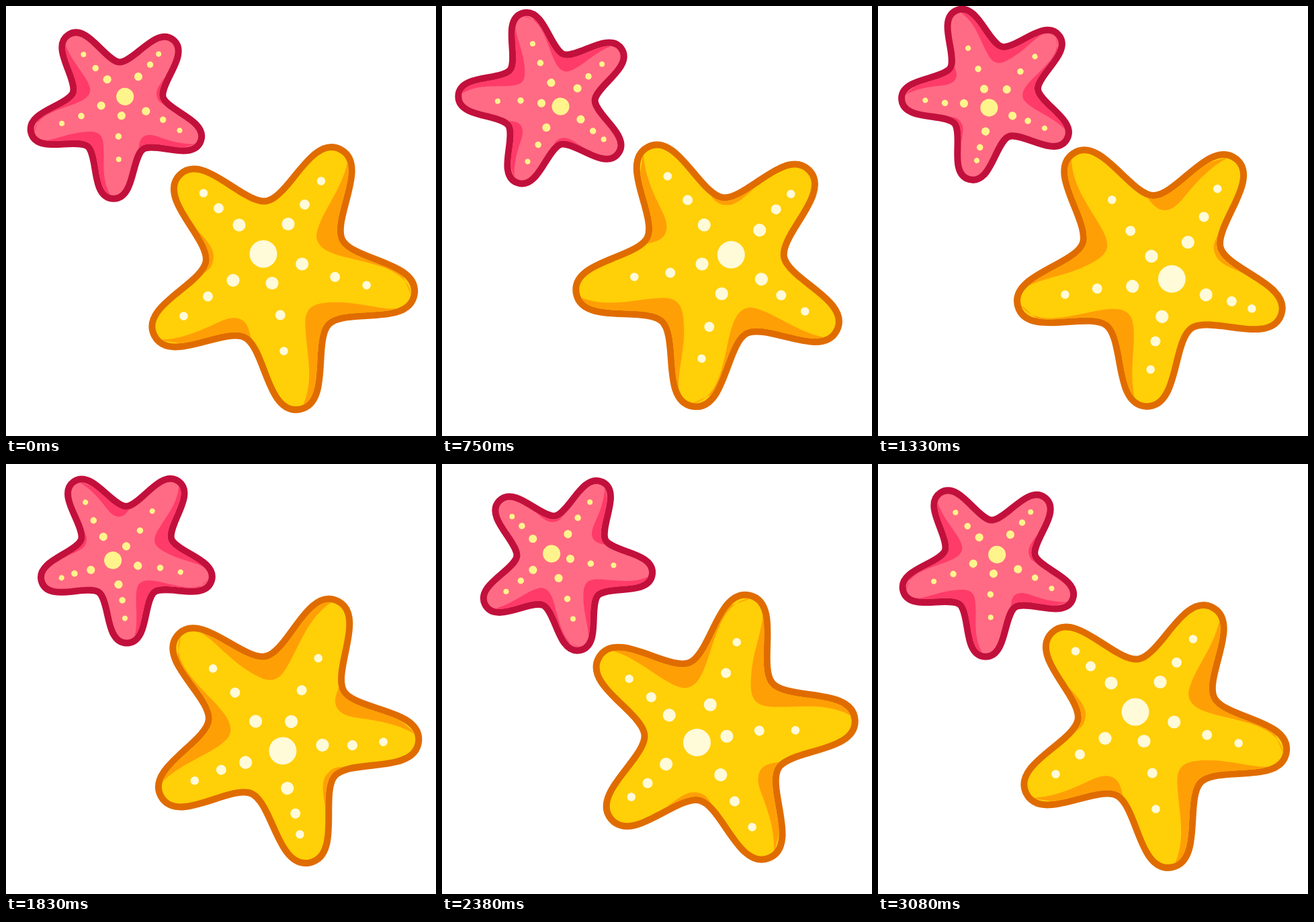
Animation, 640 px wide and 640 px high, one loop 3.12 s. Source, as an HTML page:

```html
<!DOCTYPE html>
<html lang="en">
<head>
<meta charset="utf-8">
<title>Two turning starfish</title>
<style>
  html, body { margin: 0; width: 100%; height: 100%; overflow: hidden; background: #fff; }
  svg { display: block; width: 100vw; height: 100vh; }
</style>
</head>
<body>
<svg id="stage" viewBox="0 0 640 640"></svg>
<script>
const LOOP = 3120;
const TURN = 93;   // poses in one full turn
const RIM = 10;    // outline width, the same on both stars

// Both stars share one drawing; the pink one is smaller and mirrored.
const HUB = [404.3, 397];
const stars = [
  { at: [165.6, 154], pivot: [169.4, 141.8], tilt: 173.8, size: 0.636, flip: -1,
    fill: '#ff6b84', shade: '#ff3b69', edge: '#c2103c', dot: '#fff48c' },
  { at: HUB, pivot: [406, 393.7], tilt: 0, size: 1, flip: 1,
    fill: '#ffcf08', shade: '#ff9f06', edge: '#e06c00', dot: '#fffad8' }
];

// Shadows in four of the five notches.
const shades = [
  'M510 222C505 270 465 310 462 342C463 368 500 372 535 381S598 400 604 432',
  'M592 447C575 458 530 440 490 441C450 441 443 452 446 485C449 525 459 560 440 599',
  'M226 497C265 497 300 478 320 469S357 463 362 484S368 505 376 520',
  'M254 296C268 322 309 350 309 372S294 396 280 408'
];

// Five spokes of dots, from the middle outwards.
const middle = [383, 369, 20.5];
const dotSizes = [9.6, 7.5, 6.3];
const spokes = [
  [[347, 326], [316.5, 301], [294, 278.5]],
  [[420, 324.5], [444.5, 295.5], [469, 260.5]],
  [[440.7, 384], [489.7, 403.3], [536.7, 415.5]],
  [[396, 412.5], [408.3, 460], [413.5, 513.5]],
  [[338, 408.3], [300.5, 432.3], [264.5, 461.5]]
];
const dots = [middle, ...spokes.flatMap(s => s.map((p, i) => [...p, dotSizes[i]]))];

// Regular star with rounded tips and notches.
function starPath() {
  const tip = 201, notch = 103, tipPull = 43.5, notchPull = 37, first = -63;
  // A point at a radius and angle, moved sideways along the circle's tangent.
  const point = (radius, degrees, side) => {
    const a = degrees * Math.PI / 180, c = Math.cos(a), s = Math.sin(a);
    return `${HUB[0] + radius * c - side * s} ${HUB[1] + radius * s + side * c} `;
  };
  let d = 'M' + point(tip, first, 0);
  for (let k = 0; k < 5; k++) {
    const a = first + 72 * k, b = a + 36, c = a + 72;
    d += 'C' + point(tip, a, tipPull) + point(notch, b, -notchPull) + point(notch, b, 0);
    d += 'C' + point(notch, b, notchPull) + point(tip, c, -tipPull) + point(tip, c, 0);
  }
  return d + 'Z';
}

function add(parent, tag, attrs) {
  const el = document.createElementNS('http://www.w3.org/2000/svg', tag);
  for (const key in attrs) el.setAttribute(key, attrs[key]);
  return parent.appendChild(el);
}

const stage = document.getElementById('stage');
const outline = starPath();
add(add(stage, 'clipPath', { id: 'body' }), 'path', { d: outline });

for (const star of stars) {
  const { at, tilt, size, flip } = star;
  star.group = add(stage, 'g', {});
  const art = add(star.group, 'g', {
    transform: `translate(${at}) rotate(${tilt}) scale(${size} ${size * flip}) translate(${-HUB[0]} ${-HUB[1]})`
  });
  add(art, 'path', { d: outline, stroke: star.edge, 'stroke-width': 2 * RIM / size, 'stroke-linejoin': 'round' });
  add(art, 'path', { d: outline, fill: star.fill });
  const inside = add(art, 'g', { 'clip-path': 'url(#body)' });
  for (const d of shades) add(inside, 'path', { d, fill: star.shade });
  for (const [cx, cy, r] of dots) add(inside, 'circle', { cx, cy, r, fill: star.dot });
}

// 24 pictures a second, timed to 10 ms, taken from poses at 30 a second.
function draw(time) {
  const ticks = Math.floor(time % LOOP / 10);
  const picture = Math.ceil((ticks + 0.5) * 6 / 25) - 1;
  const angle = Math.round(picture * 30 / 24) * 360 / TURN;
  for (const { group, pivot } of stars)
    group.setAttribute('transform', `rotate(${angle} ${pivot.join(' ')})`);
}

const start = performance.now();
function tick() {
  draw(performance.now() - start);
  requestAnimationFrame(tick);
}
tick();
</script>
</body>
</html>
```
